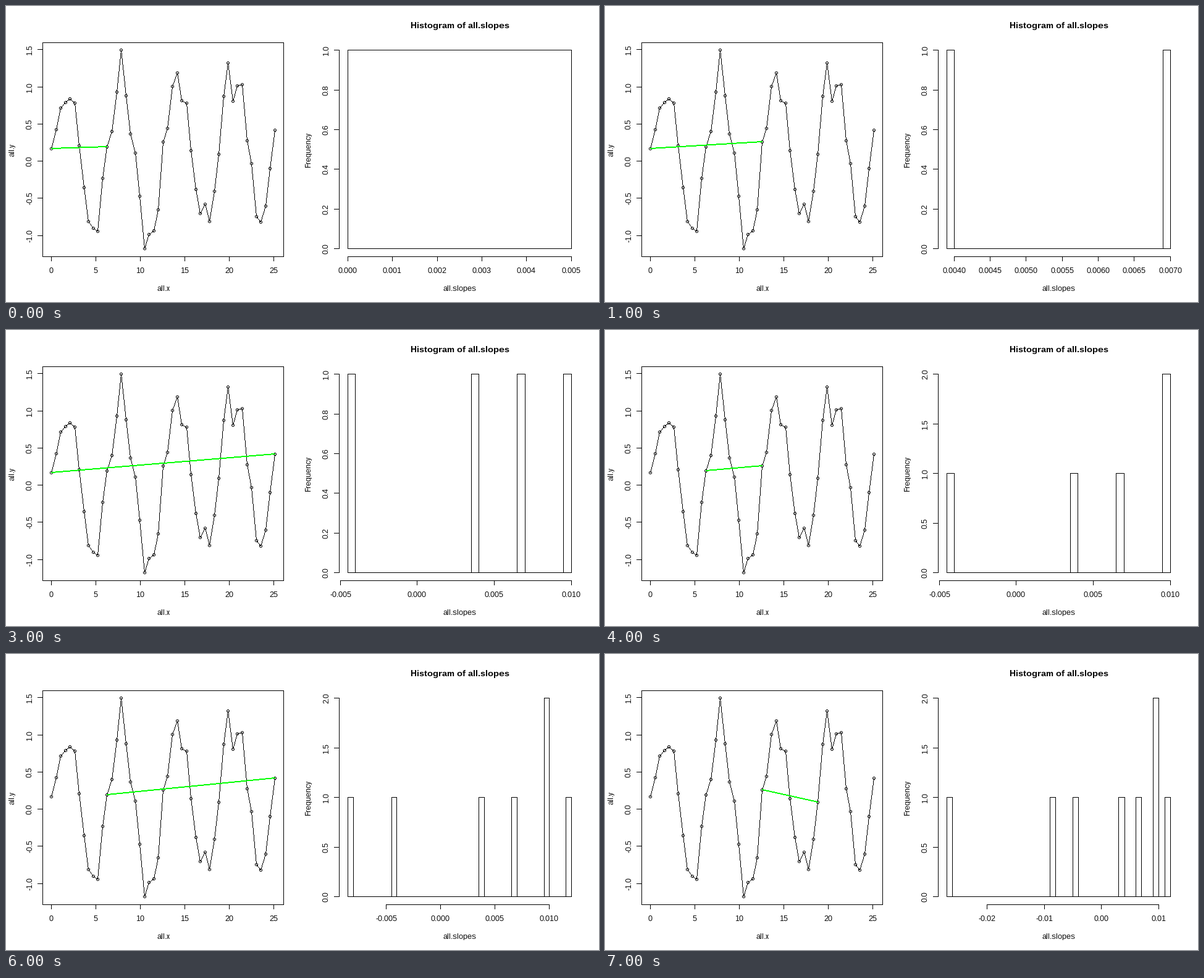
Animation, 960 px wide and 480 px high, one loop 8000 ms. Source, as a matplotlib script:

```python
import itertools
import math

import numpy as np
import matplotlib.pyplot as plt
from matplotlib.animation import FuncAnimation

plt.rcParams.update({
    "font.family": "Liberation Sans",
    "text.hinting": "default",
    "text.hinting_factor": 1,
    "path.simplify": False,
})

W, H = 960, 480
PERIOD = 12            # samples per cycle
FRAMES = 8

# panel layout, measured in text lines
LINE = 14.4
LEFT, RIGHT = 4.1 * LINE, W / 2 - 2.1 * LINE
TOP, BOTTOM = 4.1 * LINE, H - 5.1 * LINE
PAD = 0.04 / 1.08      # free part of a panel on each side of the data
TICK = LINE / 2

ALL_Y = np.array([
    .169, .425, .715, .79, .836, .782, .21, -.354, -.81, -.9, -.943, -.23,
    .1938, .4, .931, 1.49, .881, .367, .11, -.47, -1.178, -.984, -.934, -.653,
    .2563, .442, 1.006, 1.188, .815, .782, .143, -.379, -.702, -.578, -.81, -.404,
    .09, .873, 1.321, .807, 1.014, 1.031, .276, -.031, -.744, -.818, -.603, -.097,
    .416])
ALL_X = np.arange(len(ALL_Y)) * 2 * math.pi / PERIOD

# every pair of points that sit at the same phase
PAIRS = list(itertools.combinations(range(0, len(ALL_Y), PERIOD), 2))[:FRAMES]
SLOPES = [(ALL_Y[b] - ALL_Y[a]) / (ALL_X[b] - ALL_X[a]) for a, b in PAIRS]

fig = plt.figure(figsize=(W / 72, H / 72), dpi=72, facecolor="white")
ax = fig.add_axes([0, 0, 1, 1])


def scale_x(v, lo, hi, panel):
    share = PAD + (1 - 2 * PAD) * (np.asarray(v) - lo) / (hi - lo)
    return np.floor(panel * W / 2 + LEFT + (RIGHT - LEFT) * share)


def scale_y(v, lo, hi):
    share = PAD + (1 - 2 * PAD) * (np.asarray(v) - lo) / (hi - lo)
    return np.floor(BOTTOM - (BOTTOM - TOP) * share)


def line(xs, ys):
    """Straight horizontal and vertical strokes."""
    ax.plot(np.floor(xs), np.floor(ys), color="black", lw=1, aa=False,
            snap=False, solid_capstyle="projecting", solid_joinstyle="miter")


def dots(xs, ys, color="black"):
    """Fill single pixels with short dashes."""
    dash = np.array([-0.3, 0.3, np.nan])
    ax.plot((np.ravel(xs)[:, None] + dash).ravel(), np.repeat(np.ravel(ys), 3),
            color=color, lw=0.4, aa=False, snap=False, solid_capstyle="butt")


def trace(xs, ys):
    """Pixels of a slanted line, one per step along its longer side."""
    parts = []
    for x0, y0, x1, y1 in zip(xs, ys, xs[1:], ys[1:]):
        n = int(max(abs(x1 - x0), abs(y1 - y0))) + 1
        parts.append([np.linspace(x0, x1, n), np.linspace(y0, y1, n)])
    return np.floor(np.hstack(parts) + 0.5)


def text(x, y, s, size=12, angle=0, weight="normal"):
    ax.text(x, y, s, size=size, rotation=angle, weight=weight, color="black",
            ha="center", va="baseline", rotation_mode="anchor")


def x_axis(pos, labels):
    line([pos[0], pos[-1]], [BOTTOM, BOTTOM])
    for p, s in zip(pos, labels):
        line([p, p], [BOTTOM, BOTTOM + TICK])
        text(p, 432.5, s)


def y_axis(panel, pos, labels):
    x = panel * W / 2 + LEFT
    line([x, x], [pos[0], pos[-1]])
    for p, s in zip(pos, labels):
        line([x - TICK, x], [p, p])
        text(panel * W / 2 + 41.5, p, s, angle=90)


def titles(panel, x_title, y_title):
    x = panel * W / 2
    text(x + 254.4, 461.5, x_title)
    text(x + 12.5, 232.8, y_title, angle=90)


def pretty_step(span, n):
    """Round step of 1, 2, 5 or 10 that cuts span into about n cells."""
    cell = span / n
    base = 10.0 ** math.floor(math.log10(cell))
    step = base
    for mult, bias in ((2, 1.5), (5, 2.75), (10, 1.5)):
        if mult * base - cell >= bias * (cell - step):
            break
        step = mult * base
    return step


def ticks(lo, hi):
    """Tick values and labels for a range widened by 4% at both ends."""
    pad = 0.04 * (hi - lo)
    step = pretty_step(hi - lo + 2 * pad, 5)
    first = math.ceil((lo - pad) / step)
    last = math.floor((hi + pad) / step)
    digits = max(0, math.ceil(-math.log10(step) - 1e-9))
    values = [k * step for k in range(first, last + 1)]
    return values, [f"{v:.{digits}f}" for v in values]


def draw_series(pair):
    line([LEFT, RIGHT, RIGHT, LEFT, LEFT], [TOP, TOP, BOTTOM, BOTTOM, TOP])
    x_range = ALL_X.min(), ALL_X.max()
    y_range = ALL_Y.min(), ALL_Y.max()
    values, labels = ticks(*x_range)
    x_axis(scale_x(values, *x_range, 0), labels)
    values, labels = ticks(*y_range)
    y_axis(0, scale_y(values, *y_range), labels)
    titles(0, "all.x", "all.y")

    px, py = scale_x(ALL_X, *x_range, 0), scale_y(ALL_Y, *y_range)
    dots(*trace(px, py))
    ring = np.array([(i, j) for i in range(-2, 3) for j in range(-2, 3)
                     if 4 <= i * i + j * j <= 5])
    dots(px[:, None] + ring[:, 0], py[:, None] + ring[:, 1])

    ends = list(pair)
    gx, gy = trace(px[ends], py[ends])
    for shift in (0, 1):
        dots(gx, gy - shift, "#00ff00")


def draw_histogram(slopes):
    span = max(slopes) - min(slopes)
    width = pretty_step(span, 30) if span else 0.005
    bins = [math.ceil(s / width) - 1 for s in slopes]
    lo, hi = min(bins) * width, (max(bins) + 1) * width
    peak = max(bins.count(b) for b in bins)

    base = scale_y(0, 0, peak)
    line(scale_x([lo, hi], lo, hi, 1), [base, base])
    for b in set(bins):
        x0, x1 = scale_x([b * width, (b + 1) * width], lo, hi, 1)
        y = scale_y(bins.count(b), 0, peak)
        line([x0, x0, x1, x1], [base, y, y, base])

    values, labels = ticks(lo, hi)
    x_axis(scale_x(values, lo, hi, 1), labels)
    values, labels = ticks(0, peak)
    y_axis(1, scale_y(values, 0, peak), labels)
    titles(1, "all.slopes", "Frequency")
    text(734.4, 35.5, "Histogram of all.slopes", 14, weight="bold")


def update(i):
    ax.clear()
    ax.set_axis_off()
    # integer coordinates are pixel centres
    ax.set_xlim(-0.5, W - 0.5)
    ax.set_ylim(H - 0.5, -0.5)
    draw_series(PAIRS[i])
    draw_histogram(SLOPES[:i + 1])
    return []


anim = FuncAnimation(fig, update, frames=FRAMES, init_func=lambda: update(0),
                     interval=1000, repeat=True, repeat_delay=0)
plt.show()
```
